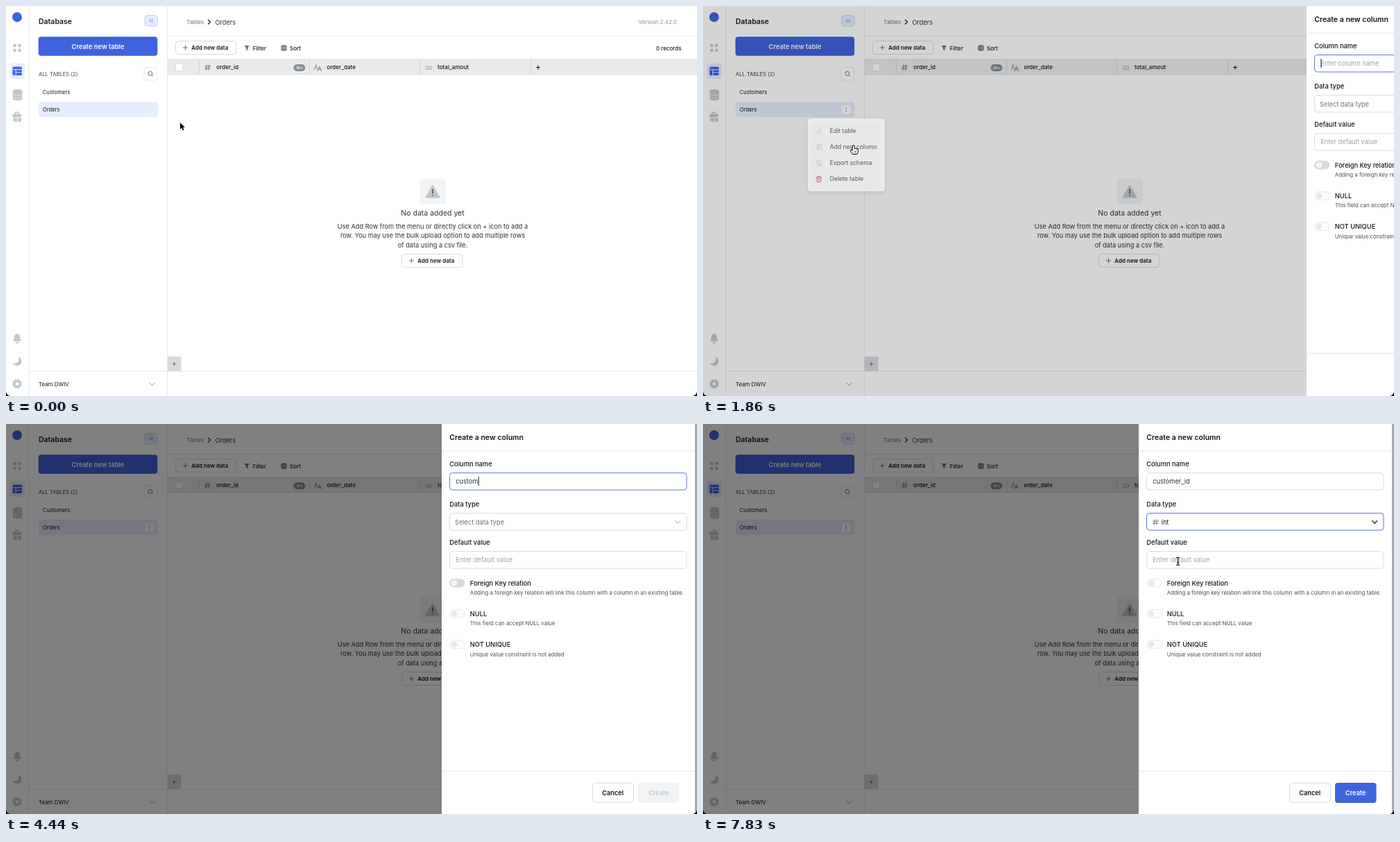
Write an HTML page with a canvas that moves like this. It is 996 px wide and 562 px high and loops after 8 s.

```html
<!DOCTYPE html>
<html lang="en">
<head>
<meta charset="utf-8">
<title>Create a new column</title>
<style>
html, body { margin: 0; width: 100%; height: 100%; overflow: hidden; background: #fff; }
canvas { display: block; width: 996px; height: 562px; }
</style>
</head>
<body>
<canvas id="stage"></canvas>
<script>
const W = 996, H = 562, LOOP = 8000, TICK = 30;
const INK = '#11181c', BODY = '#2b3237', NOTE = '#4c5155', MID = '#687076', SOFT = '#889096', PALE = '#c1c8cd';
const LINE = '#e6e8eb', EDGE = '#d7dbdf', BLUE = '#3e63dd', FOCUS = '#5c78d2', TINT = '#e6edfe';
const canvas = document.getElementById('stage');
const c = canvas.getContext('2d');
const dpr = window.devicePixelRatio || 1;
canvas.width = W * dpr;
canvas.height = H * dpr;

// Timeline
const FADE_MENU = 600, OPEN = 1794.5, PICK = 6930, CHOSEN = 7710;
const NAME = 'customer_id';
const KEYS = [2970, 3210, 3540, 4140, 4260, 4440, 4680, 4830, 5490, 5790, 5910];
const MOUSE = [
  [0, 251, 168], [450, 206, 149], [780, 206, 149], [900, 207, 156], [1080, 207, 156],
  [1690, 217, 201], [2240, 217, 201], [2520, 563, 180], [6240, 563, 180],
  [6390, 529, 172], [6840, 702, 143], [7050, 702, 143], [7530, 684, 197], [8000, 684, 197]
];
const TYPES = ['varchar', 'int', 'bigint', 'serial', 'double precision', 'boolean'];

const clamp = v => Math.max(0, Math.min(1, v));
const ramp = (t, from, span) => clamp((t - from) / span);

// CSS "ease" curve
function ease(x) {
  let lo = 0, hi = 1;
  for (let i = 0; i < 20; i++) {
    const u = (lo + hi) / 2;
    if (.75 * u * (1 - u) * (1 - u) + .75 * u * u * (1 - u) + u ** 3 < x) lo = u; else hi = u;
  }
  return .3 * lo * (1 - lo) ** 2 + 3 * lo * lo * (1 - lo) + lo ** 3;
}

function mouseAt(t) {
  const i = Math.max(1, MOUSE.findIndex(m => m[0] > t));
  const [t0, x0, y0] = MOUSE[i - 1], [t1, x1, y1] = MOUSE[i];
  const k = ramp(t, t0, t1 - t0), s = k * k * (3 - 2 * k);
  return [x0 + (x1 - x0) * s, y0 + (y1 - y0) * s];
}

function text(str, x, y, size, weight = 400, color = INK, align = 'left') {
  c.font = `${weight} ${size}px Inter, sans-serif`;
  c.fillStyle = color;
  c.textAlign = align;
  c.fillText(str, x, y);
}

function box(x, y, w, h, r, fill, stroke) {
  c.beginPath();
  c.roundRect(x, y, w, h, r);
  if (fill) { c.fillStyle = fill; c.fill(); }
  if (stroke) { c.strokeStyle = stroke; c.lineWidth = 1; c.stroke(); }
}

function rect(x, y, w, h, fill) {
  c.fillStyle = fill;
  c.fillRect(x, y, w, h);
}

function disc(x, y, r, fill) {
  c.beginPath();
  c.arc(x, y, r, 0, 7);
  c.fillStyle = fill;
  c.fill();
}

// Path with its own origin
function shape(d, x, y, fill, stroke, width = 1) {
  const p = new Path2D(d);
  c.save();
  c.translate(x, y);
  c.lineJoin = c.lineCap = 'round';
  if (stroke) { c.strokeStyle = stroke; c.lineWidth = width; c.stroke(p); }
  if (fill) { c.fillStyle = fill; c.fill(p); }
  c.restore();
}

const plus = (x, y, r, color = INK, w = 1) => shape(`M${-r} 0H${r}M0 ${-r}V${r}`, x, y, null, color, w);
const chevron = (x, y, color, w) => shape('M-3.6 -1.8L0 1.8L3.6 -1.8', x, y, null, color, w);
const hash = (x, y) => shape('M-1 -3.8L-2.4 3.8M2.4 -3.8L1 3.8M-3.6 -1.5H4M-4 1.5H3.6', x, y, null, MID, .9);

function iconBar() {
  disc(16, 16, 7, BLUE);
  for (const dx of [-3.5, 3.5]) for (const dy of [-3.5, 3.5]) disc(16 + dx, 60.5 + dy, 2.4, PALE);
  box(5.5, 82.5, 21.5, 22.5, 4, TINT);
  box(9.5, 87.5, 13.5, 12.5, 2, BLUE);
  rect(9.5, 91.2, 13.5, 1, TINT);
  rect(13.6, 91.2, 1, 9, TINT);
  rect(14, 95.4, 9, .9, TINT);
  for (let i = 2; i >= 0; i--) {
    shape('M-6.7 -2V2C-6.7 5 6.7 5 6.7 2V-2Z', 16.5, 124.5 + i * 3.7, PALE, '#fff', .8);
  }
  shape('M-6.7 0C-6.7 -4 6.7 -4 6.7 0C6.7 3.4 -6.7 3.4 -6.7 0', 16.5, 122.7, PALE);
  shape('M-2.5 -3.5V-5.8H2.5V-3.5', 15.7, 159, null, PALE, 1.4);
  box(9.3, 155.5, 13, 5, 1.5, PALE);
  shape('M-5 0H5V2L0 6L-5 4Z', 15.5, 161.5, PALE);
  disc(19.5, 164, 4, '#fff');
  disc(19.5, 164, 3, PALE);
  shape('M-6 4C-4 2 -4.5 -1 -4 -3C-3 -8 3 -8 4 -3C4.5 -1 4 2 6 4Z', 16, 479, PALE);
  shape('M-2 6Q0 8 2 6Z', 16, 479, PALE, PALE);
  shape('M2 -6.5C4 0 0 4 -6.2 2.8C-4 7.5 4 7.6 6 2.4C7.4 -1.5 5 -5.6 2 -6.5Z', 16, 512, PALE);
  for (let i = 0; i < 8; i++) {
    const a = i * Math.PI / 4 + .39;
    disc(16 + 5 * Math.cos(a), 544.5 + 5 * Math.sin(a), 2, PALE);
  }
  disc(16, 544.5, 5.7, PALE);
  disc(16, 544.5, 2.2, '#fff');
}

function sidebar(hover) {
  text('Database', 47, 25.5, 10.5, 600);
  box(200, 13.5, 18.5, 15.5, 4, TINT, '#c6d4f9');
  shape('M-.6 -2L-2.6 0L-.6 2M2.4 -2L.4 0L2.4 2', 209.3, 21.2, null, BLUE, .8);
  box(46.7, 44.2, 171.6, 27.6, 4, BLUE);
  text('Create new table', 132.5, 61.5, 9.3, 600, '#fff', 'center');
  text('ALL TABLES (2)', 47, 100.8, 7.6, 400, '#3b4146');
  box(199, 88.5, 19, 18.5, 4, '#fff', LINE);
  c.beginPath();
  c.arc(208, 97.3, 2.9, 0, 7);
  c.strokeStyle = MID;
  c.stroke();
  shape('M0 0L1.8 1.8', 210.2, 99.5, null, MID);
  text('Customers', 52.7, 127.2, 7.75);
  box(47, 138, 172, 22, 4, TINT);
  text('Orders', 52.7, 152.2, 7.75);
  if (hover) {
    box(199.5, 142.5, 13.5, 13.5, 3, '#fff', LINE);
    for (const dy of [-2.7, 0, 2.7]) disc(206.3, 149.3 + dy, .75, MID);
  }
  text('Team DWIV', 47, 547.8, 7.9);
  chevron(210.8, 545, SOFT, 1);
}

function addButton(x, y) {
  box(x + .5, y + .5, 87.5, 19, 4, '#fff', EDGE);
  plus(x + 14.5, y + 10, 3.2, MID);
  text('Add new data', x + 23.3, y + 13, 8, 600);
}

function tableView() {
  text('Tables', 260.3, 26, 8.1, 400, MID);
  shape('M-1.5 -3L1.5 0L-1.5 3', 293, 23, null, INK, 1.2);
  text('Orders', 301.5, 26.5, 9.2, 400, BODY);
  text('Version 2.42.0', 967, 26, 8.05, 400, SOFT, 'right');
  addButton(244, 50);
  shape('M-3.6 -3.5H3.6L1.2 0V3.6L-1.2 2.6V0Z', 347.3, 60.5, MID);
  text('Filter', 355.8, 63.5, 8, 500);
  box(396.5, 56.5, 8, 8, 1.5, MID);
  shape('M-1.5 2V-2M1.5 -2V2', 400.5, 60.5, null, '#fff', .9);
  text('Sort', 409, 63.5, 8, 500);
  text('0 records', 973.5, 63.5, 8, 500, INK, 'right');

  rect(233, 77, 763, 21.5, '#e9eaec');
  rect(233, 76.5, 763, 1, EDGE);
  rect(233, 98, 763, 1, EDGE);
  for (const x of [278, 437, 596, 756]) rect(x, 77, 1, 21.5, '#d0d5d9');
  box(244.5, 83, 10.5, 10.5, 2, '#fff', EDGE);
  hash(290.5, 88.5);
  text('order_id', 303.3, 91.3, 8.1, 500);
  box(414.5, 84, 17, 10, 5, SOFT);
  c.beginPath();
  c.arc(420.8, 89, 1.6, 0, 7);
  c.strokeStyle = '#fff';
  c.lineWidth = .9;
  c.stroke();
  shape('M0 0H4.2V1.5', 422.5, 89, null, '#fff', .9);
  shape('M-5 3.4L-2.6 -4.4L-.6 2M-4.3 .8H-1', 449.5, 88.5, null, SOFT, .9);
  shape('M-.3 5L2.4 -1.2L5.1 5M.6 3H4.2', 449.5, 88.5, null, MID, .9);
  text('order_date', 462.5, 91.3, 8.1, 500);
  text('.00', 603, 91.5, 7.4, 400, SOFT);
  text('total_amout', 622, 91.3, 8.1, 500);
  plus(767, 88.5, 2.5, INK, 1.1);

  box(596.5, 249.5, 37.5, 36, 4, '#f1f3f5');
  shape('M0 -8.5L9.5 8H-9.5Z', 615, 267.7, PALE, PALE, 2);
  shape('M0 -3.5V1.8M0 4.8V5', 615, 268, null, NOTE, 1.6);
  text('No data added yet', 615, 302.3, 10.5, 400, BODY, 'center');
  ['Use Add Row from the menu or directly click on + icon to add a',
   'row. You may use the bulk upload option to add multiple rows',
   'of data using a csv file.'
  ].forEach((s, i) => text(s, 615, 320.6 + i * 13.8, 9.2, 400, BODY, 'center'));
  addButton(570, 357);

  rect(233, 505, 19.5, 21.5, EDGE);
  plus(242.5, 515.7, 2.4, MID);
}

function page(hover) {
  rect(0, 0, W, H, '#fff');
  rect(232, 0, 1, H, LINE);
  rect(233, 43, 763, 1, LINE);
  iconBar();
  sidebar(hover);
  tableView();
  rect(32.5, 0, 1, H, LINE);
  rect(33, 526, 963, 1, LINE);
}

function menu(alpha) {
  if (alpha <= 0) return;
  c.save();
  c.globalAlpha = alpha;
  c.shadowColor = 'rgba(16,24,40,.2)';
  c.shadowBlur = 6 * dpr;
  c.shadowOffsetY = 2 * dpr;
  box(151.5, 162.5, 110, 104, 4, '#fff');
  c.shadowColor = 'transparent';
  box(151.5, 162.5, 110, 104, 4, null, '#eceef0');
  shape('M-2.5 1.5L2 -3L3.3 -1.7L-1.2 2.8L-3 3.2Z', 167.5, 179.5, PALE);
  rect(164, 183.2, 7.5, .9, PALE);
  box(163.5, 199, 8, 8.5, 1, PALE);
  rect(167.8, 199.5, .8, 7.5, '#fff');
  box(163.5, 222, 6, 8, 1, PALE);
  rect(164.8, 224.3, 3.5, .8, '#fff');
  rect(164.8, 226.4, 3.5, .8, '#fff');
  shape('M-2 0H2M0 -2L2 0L0 2', 169, 229, null, PALE, 1.2);
  shape('M-4 -2.5H4M-1.5 -2.5V-4H1.5V-2.5M-3 -2.5V4H3V-2.5M-1 -.5V2.3M1 -.5V2.3', 167, 249.5, null, '#cd3a40', 1);
  ['Edit table', 'Add new column', 'Export schema', 'Delete table']
    .forEach((s, i) => text(s, 182.8, 182.7 + i * 23.2, 8.6));
  c.restore();
}

function toggle(y, filled) {
  box(639.5, y - 5.7, 21.5, 11.8, 6, filled ? EDGE : '#fbfcfd', filled ? EDGE : LINE);
  disc(646, y + .2, 4.4, filled ? '#f4f6f7' : LINE);
}

function field(y, focus) {
  box(639.5, y + .5, 341.5, 24.5, 4, '#fff', focus ? FOCUS : EDGE);
}

function typeList(t) {
  c.save();
  c.shadowColor = 'rgba(16,24,40,.18)';
  c.shadowBlur = 6 * dpr;
  c.shadowOffsetY = 2 * dpr;
  box(639.5, 157.5, 341.5, 168, 4, '#fff');
  c.restore();
  const active = mouseAt(t)[1] > 186.5 ? 1 : 0;
  TYPES.forEach((name, i) => {
    const y = 159 + i * 27.5;
    if (i === active) rect(640, y, 340.5, 27.5, '#f0f4ff');
    if (i === 0) text('A', 649, y + 17, 9, 400, MID);
    else if (i < 4) hash(652.3, y + 14);
    else text(i === 4 ? '.00' : 'T', 647.5, y + 17, 8, 400, MID);
    text(name, i === 4 ? 663 : 660.5, y + 17, 9.2);
  });
}

function drawer(t) {
  const shift = 365 * (1 - ease(ramp(t, OPEN, 300)));
  const typed = KEYS.filter(k => t >= k).length;
  const picking = t >= PICK, chosen = t >= CHOSEN;
  c.save();
  c.translate(shift, 0);
  rect(628, 0, 365, H, '#fff');
  rect(993, 0, 3, H, '#a8aab0');
  text('Create a new column', 639.3, 23.4, 10.5, 600);
  rect(628, 38.5, 365, 1, LINE);

  text('Column name', 639.3, 61.3, 9.3, 500);
  field(70, !picking);
  const value = NAME.slice(0, typed);
  text(value || 'Enter column name', 648.2, 86, 9.25, 400, typed ? BODY : '#9ba1a6');
  const lastKey = typed ? KEYS[typed - 1] : 1800;
  if (!picking && (t - lastKey) % 900 < 450) {
    const end = typed ? c.measureText(value).width : 0;
    rect(648.5 + end, 76, 1, 13, INK);
  }

  text('Data type', 639.3, 119.3, 9.3, 500);
  field(128, picking);
  if (chosen) {
    hash(652.3, 141.5);
    text('int', 660.7, 144.7, 9.2);
  } else text('Select data type', 647, 144.7, 9.25, 400, MID);
  chevron(968.2, 141.3, picking ? '#3b4146' : PALE, picking ? 1.5 : 1.3);

  text('Default value', 639.3, 174.4, 9.3, 500);
  field(183.2, false);
  text('Enter default value', 648.2, 199.4, 9.25, 400, '#9ba1a6');

  [['Foreign Key relation', 'Adding a foreign key relation will link this column with a column in an existing table.'],
   ['NULL', 'This field can accept NULL value'],
   ['NOT UNIQUE', 'Unique value constraint is not added']
  ].forEach(([head, note], i) => {
    const y = 229 + i * 44.2;
    toggle(y, i === 0 && !chosen);
    text(head, 668.8, y + 3.6, 9.3, 500);
    text(note, 668.8, y + 17.2, 7.87, 400, NOTE);
  });

  rect(628, 500, 365, 1, LINE);
  box(845.5, 517.5, 59, 27.5, 4, '#fff', EDGE);
  text('Cancel', 874.7, 534.8, 9.2, 600, INK, 'center');
  box(911, 517, 59.5, 29, 4, '#f1f3f5');
  text('Create', 940.7, 534.8, 9.2, 600, PALE, 'center');
  if (chosen) {
    c.globalAlpha = ramp(t, CHOSEN - 40, 160);
    box(911, 517, 59.5, 29, 4, BLUE);
    text('Create', 940.7, 534.8, 9.2, 600, '#fff', 'center');
    c.globalAlpha = 1;
  }
  if (picking && !chosen) typeList(t);
  c.restore();
}

function cursor(t) {
  if (t >= 3000 && t < 6240) return;
  const [x, y] = mouseAt(t);
  const hand = (t >= 330 && t < 1950) || (t >= 7080 && t < 7740);
  if (t >= 7740) {
    const beam = 'M-2.2 -5.5Q0 -5.5 0 -4V4Q0 5.5 -2.2 5.5M2.2 -5.5Q0 -5.5 0 -4M0 4Q0 5.5 2.2 5.5M-1.3 1.5H1.3';
    shape(beam, x + .7, y + .7, null, '#fff', 2.2);
    shape(beam, x + .7, y + .7, null, '#000', 1.1);
  } else if (hand) {
    shape('M-1 1Q0 -.5 1 1V5L2.4 4.6L3.6 5.2L5 5.2L6 6.2V9L4.8 12H-1L-4 7.6Q-4 6 -2.6 6.6L-1 8Z', x, y, '#fff', '#000', 1.8);
    shape('M1.2 8V10.3M3.2 8V10.3', x, y, null, '#000', .7);
  } else {
    shape('M0 0V9.6L2.2 7.6L3.8 11.2L5.5 10.5L3.9 7H6.8Z', x, y, '#000', '#fff', 1.3);
  }
}

function corners() {
  shape('M0 556V562H6Q1 561 0 556Z', 0, 0, '#000');
  shape('M996 556V562H990Q995 561 996 556Z', 0, 0, '#000');
}

function draw(now) {
  const t = Math.floor((now % LOOP) / TICK) * TICK;
  c.setTransform(dpr, 0, 0, dpr, 0, 0);
  page(t >= 300);
  const dim = .5 * ease(ramp(t, OPEN, 300));
  if (dim) rect(0, 0, W, H, `rgba(0,0,0,${dim})`);
  menu(ramp(t, FADE_MENU - 30, 150) - ramp(t, OPEN, 200));
  if (t > OPEN) drawer(t);
  corners();
  cursor(t);
}

let start;
function frame(now) {
  start ??= now;
  draw(now - start);
  requestAnimationFrame(frame);
}
requestAnimationFrame(frame);
</script>
</body>
</html>
```
